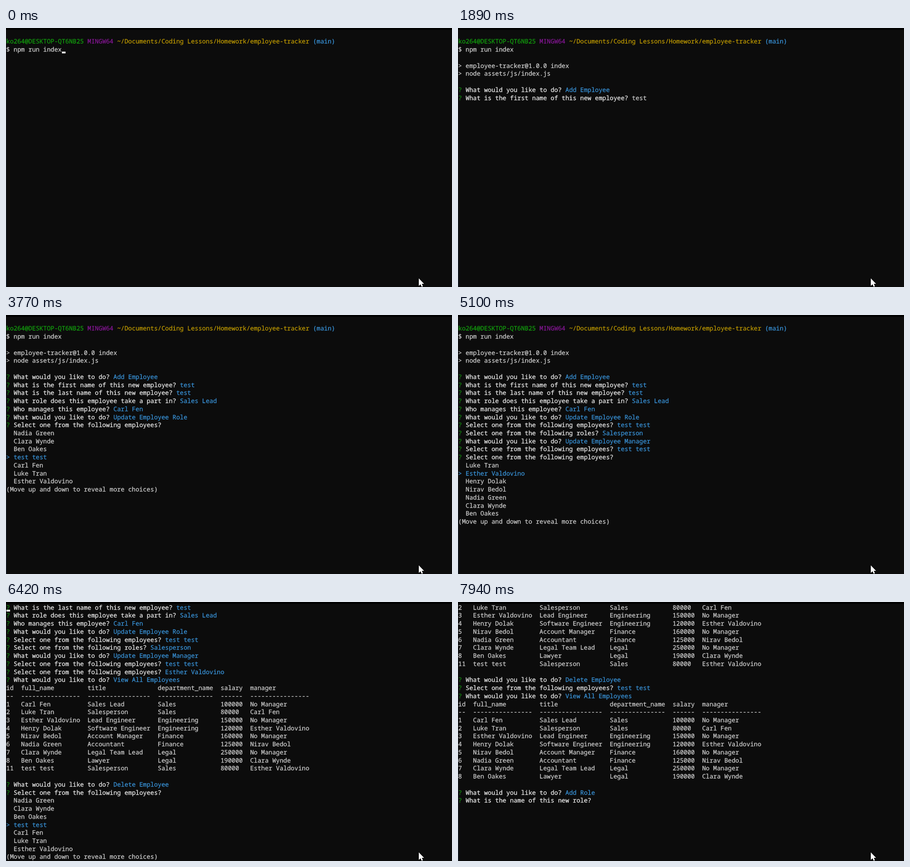
Write an HTML page that moves like this. It is 981 px wide and 571 px high and loops after 8000 ms.

```html
<!DOCTYPE html>
<html lang="en">
<head>
<meta charset="utf-8">
<title>Employee tracker</title>
<style>
html, body { margin: 0; width: 100%; height: 100%; overflow: hidden; background: #0c0c0c; }
body { position: relative; }
.top { position: absolute; inset: 0 0 auto; height: 4px; background: #000; }
.edge { position: absolute; left: 0; top: 4px; bottom: 0; width: 1px; background: linear-gradient(#101114, #1b2027 60%, #1c2c3e); }
pre {
  position: absolute; left: .5px; top: 3.7px; margin: 0; color: #d2d2d2;
  font: 13.55px/17.73px "Noto Sans Mono", "DejaVu Sans Mono", monospace;
  font-variant-ligatures: none; text-rendering: geometricPrecision;
  -webkit-text-stroke: .25px currentColor;
}
#cursor { position: absolute; width: 8px; height: 4px; background: #f2f2f2; }
svg { position: absolute; left: 907px; top: 551px; }
.g { color: #13a10e } .q { color: #138a0f } .m { color: #881798 } .y { color: #c19c00 }
.c { color: #3a96dd } .w { color: #f2f2f2 }
</style>
</head>
<body>
<div class="top"></div>
<div class="edge"></div>
<div id="cursor"></div>
<pre id="screen"></pre>
<svg width="14" height="20"><path d="M1 1V17.5L4.8 14 7.3 19.5 10 18.3 7.6 13H12.5Z" fill="#fff"/></svg>
<script>
const LOOP = 8000, ROWS = 32, CELL = 8.13, LINE = 17.73;
const HINT = '(Use arrow keys)';
const DO = 'What would you like to do?';
const PICK = 'Select one from the following employees?';
const FIRST = 'What is the first name of this new employee?';
const LAST = 'What is the last name of this new employee?';

const staff = [
  ['1', 'Carl Fen', 'Sales Lead', 'Sales', '100000', 'No Manager'],
  ['2', 'Luke Tran', 'Salesperson', 'Sales', '80000', 'Carl Fen'],
  ['3', 'Esther Valdovino', 'Lead Engineer', 'Engineering', '150000', 'No Manager'],
  ['4', 'Henry Dolak', 'Software Engineer', 'Engineering', '120000', 'Esther Valdovino'],
  ['5', 'Nirav Bedol', 'Account Manager', 'Finance', '160000', 'No Manager'],
  ['6', 'Nadia Green', 'Accountant', 'Finance', '125000', 'Nirav Bedol'],
  ['7', 'Clara Wynde', 'Legal Team Lead', 'Legal', '250000', 'No Manager'],
  ['8', 'Ben Oakes', 'Lawyer', 'Legal', '190000', 'Clara Wynde']
];
const added = ['11', 'test test', 'Salesperson', 'Sales', '80000', 'Esther Valdovino'];
const people = staff.map(r => r[1]);
const everyone = [...people, added[1]];
const roles = staff.map(r => r[2]);
const actions = ['View All Employees', 'Add Employee', 'Update Employee Role', 'Update Employee Manager',
  'Delete Employee', 'View All Roles', 'Add Role', 'Delete Role', 'View All Departments', 'Add Department'];

const paint = (cls, text) => `<span class="${cls}">${text}</span>`;
const ask = (q, rest = '') => `${paint('q', '?')} ${paint('w', q)} ${rest}`;

function menu(q, items, active = 0, top = 0, hint = '') {
  const lines = [ask(q, hint)];
  for (let i = 0; i < 7; i++) {
    const k = (top + i) % items.length;
    lines.push(k === active ? paint('c', '> ' + items[k]) : '  ' + items[k]);
  }
  if (items.length > 7) lines.push('(Move up and down to reveal more choices)');
  return lines;
}

function table(rows) {
  const widths = [2, 16, 17, 15, 6, 16];
  const head = ['id', 'full_name', 'title', 'department_name', 'salary', 'manager'];
  const rule = widths.map(w => '-'.repeat(w));
  return [head, rule, ...rows].map(r => r.map((s, i) => s.padEnd(widths[i])).join('  ')).concat('');
}

// The log holds finished lines; each step adds live lines below it.
const log = ['', [paint('g', 'ko264@DESKTOP-QT6NB25'), paint('m', 'MINGW64'),
  paint('y', '~/Documents/Coding Lessons/Homework/employee-tracker'), paint('c', '(main)')].join(' '), '$ npm run index'];
const steps = [];
let scroll = 0;

function show(t, live = [], cursor = null) {
  const lines = [...log, ...live];
  scroll = Math.max(scroll, lines.length - ROWS);
  steps.push({ t, html: lines.slice(scroll).join('\n'), cursor });
}
const answer = (q, a) => log.push(ask(q, paint('c', a)));
const mainMenu = t => show(t, menu(DO, actions, 0, 0, HINT));
const pickAdded = t => show(t, menu(PICK, everyone, 8, 5));

show(0, [], [15, 2]);
show(400, [], [0, 3]);
log.push('', '> employee-tracker@1.0.0 index', '> node assets/js/index.js', '');
show(750, [], [0, 7]);
show(950, menu(DO, actions, 1));

answer(DO, 'Add Employee');
show(1210, [ask(FIRST)], [47, 8]);
for (let n = 1; n <= 4; n++) show(1478 + 82 * n, [ask(FIRST, 'test'.slice(0, n))], [47 + n, 8]);
show(1890, [ask(FIRST, 'test')]);
answer(FIRST, 'test');
show(2090, [ask(LAST)]);
show(2160, [ask(LAST)], [46, 9]);
show(2430, [ask(LAST, 'test')], [50, 9]);
answer(LAST, 'test');
const PART = 'What role does this employee take a part in?';
show(2630, menu(PART, roles, 0, 0, HINT));
answer(PART, 'Sales Lead');
const BOSS = 'Who manages this employee?';
show(3110, menu(BOSS, people, 0, 0, HINT));
answer(BOSS, people[0]);
mainMenu(3440);

answer(DO, 'Update Employee Role');
pickAdded(3770);
answer(PICK, 'test test');
const ROLE = 'Select one from the following roles?';
show(4110, menu(ROLE, roles.slice(1), 0, 0, HINT));
answer(ROLE, 'Salesperson');
mainMenu(4440);

answer(DO, 'Update Employee Manager');
pickAdded(4770);
answer(PICK, 'test test');
show(5100, menu(PICK, everyone, 2, 1));
answer(PICK, people[2]);
mainMenu(5430);

answer(DO, 'View All Employees');
log.push(...table([...staff, added]));
mainMenu(5760);
show(6090, menu(DO, actions, 4, 1));

answer(DO, 'Delete Employee');
show(6420, menu(PICK, everyone, 8, 5), [0, 0]);
answer(PICK, 'test test');
mainMenu(6750);

answer(DO, 'View All Employees');
log.push(...table(staff));
mainMenu(7080);
show(7410, menu(DO, actions, 6, 3));

answer(DO, 'Add Role');
const NAME = 'What is the name of this new role?';
show(7740, [ask(NAME)], [37, 24]);
show(7940, [ask(NAME)]);

const screenEl = document.getElementById('screen');
const cursorEl = document.getElementById('cursor');
let current = null;

function draw() {
  const t = performance.now() % LOOP;
  const step = steps.findLast(s => s.t <= t);
  if (step !== current) {
    current = step;
    screenEl.innerHTML = step.html;
    cursorEl.hidden = !step.cursor;
    if (step.cursor) {
      const [col, row] = step.cursor;
      cursorEl.style.left = Math.round(.7 + col * CELL) + 'px';
      cursorEl.style.top = Math.round(16.8 + row * LINE) + 'px';
    }
  }
  requestAnimationFrame(draw);
}
draw();
</script>
</body>
</html>
```
